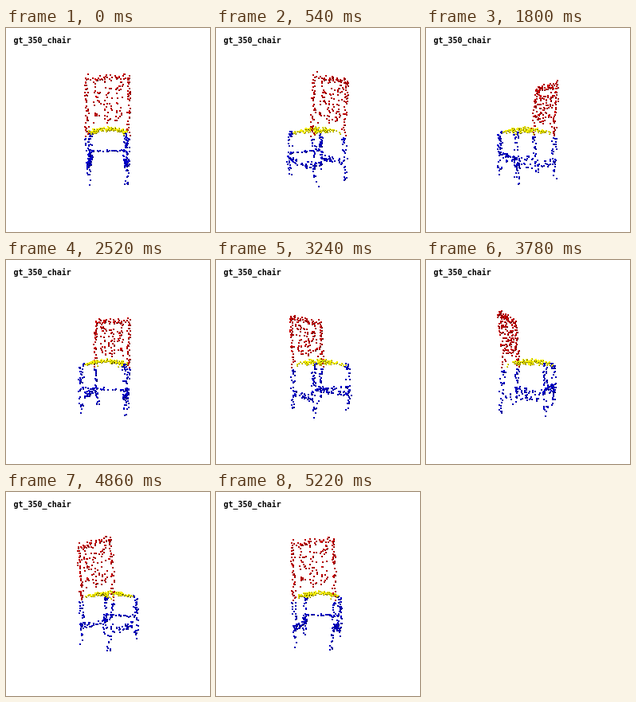
Recreate the animation shown at these times as an HTML page with a canvas. Size 256 px wide and 256 px high, loop 5400 ms.

```html
<!DOCTYPE html>
<html>
<head>
<meta charset="utf-8">
<style>
html, body { margin: 0; width: 100%; height: 100%; overflow: hidden; background: #fff; }
canvas { position: absolute; left: 0; top: 0; }
p { position: absolute; left: 9.5px; top: 10px; margin: 0; color: #000;
    font: bold 10px/12px "DejaVu Sans Mono", "Liberation Mono", monospace; }
</style>
</head>
<body>
<canvas id="stage" width="256" height="256"></canvas>
<p>gt_350_chair</p>
<script>
const ctx = document.getElementById('stage').getContext('2d');
const LOOP = 5400, STEPS = 30, EYE = 222, MID = 128;
const RED = ['#d00000', '#400000'];
const YELLOW = ['#f8f000', '#5c5800'];
const BLUE = ['#0000d0', '#000050'];

let seed = 350;
const rand = () => (seed = (seed * 16807) % 2147483647) / 2147483647;
const spread = r => (rand() * 2 - 1) * r;

// Chair space: x across, y down, z towards the backrest.
const points = [];
function scatter(count, color, place) {
  for (let i = 0; i < count; i++) points.push({ color, at: place() });
}
const lean = y => 22 + 6.5 * Math.abs(y) / 61;

// Backrest slats and top rail
for (const x of [-12, 0, 12]) {
  scatter(32, RED, () => {
    const y = -8 - 53 * rand();
    return [x + spread(4.5), y, lean(y) + spread(2.5)];
  });
}
scatter(22, RED, () => [spread(24), -58 + spread(3.5), lean(60) + spread(2)]);

// Seat, slightly domed
scatter(125, YELLOW, () => {
  const u = spread(1), v = spread(1);
  return [u * 23.5, -4 + 4 * (u * u + v * v) + rand() * 3.5, -3 + v * 25];
});

for (const side of [-1, 1]) {
  // Back post
  scatter(42, RED, () => {
    const y = 8 - 69 * rand();
    return [side * (23.5 + spread(2)), y, lean(y) + spread(2.5)];
  });
  // Back leg, tapering inwards
  scatter(32, BLUE, () => {
    const t = rand() ** 1.7;
    return [side * (23.5 - 3 * t + spread(2.2)), 10 + 51 * t, 23 + 4 * t + spread(3)];
  });
  // Front leg
  scatter(42, BLUE, () => {
    const t = rand();
    return [side * (24.5 + 1.5 * t + spread(2.7)), 1 + 58 * t, -28 + spread(2.7)];
  });
  // Side rung
  scatter(30, BLUE, () => [side * (23 + spread(2)), 39 + spread(4), -2 + spread(25)]);
}
// Front rung
scatter(24, BLUE, () => [spread(23), 29.5 + spread(1.5), -28 + spread(2)]);

function project({ color, at: [x, y, z] }, sin, cos) {
  const depth = z * cos - x * sin;
  const scale = EYE / (EYE - depth);
  return {
    color, depth,
    x: Math.round(MID + (x * cos + z * sin) * scale),
    y: Math.round(MID + y * scale)
  };
}

function draw(step) {
  const angle = step / STEPS * 2 * Math.PI;
  const sin = Math.sin(angle), cos = Math.cos(angle);
  const dots = points.map(p => project(p, sin, cos)).sort((a, b) => a.depth - b.depth);
  ctx.fillStyle = '#fff';
  ctx.fillRect(0, 0, 256, 256);
  for (const { color: [light, dark], x, y } of dots) {
    ctx.fillStyle = light;
    ctx.fillRect(x - 1, y - 1, 2, 2);
    ctx.fillStyle = dark;
    ctx.fillRect(x, y, 1, 1);
  }
}

const start = performance.now();
function tick() {
  const t = (performance.now() - start) % LOOP;
  draw(Math.floor(t / LOOP * STEPS));
  requestAnimationFrame(tick);
}
tick();
</script>
</body>
</html>
```
